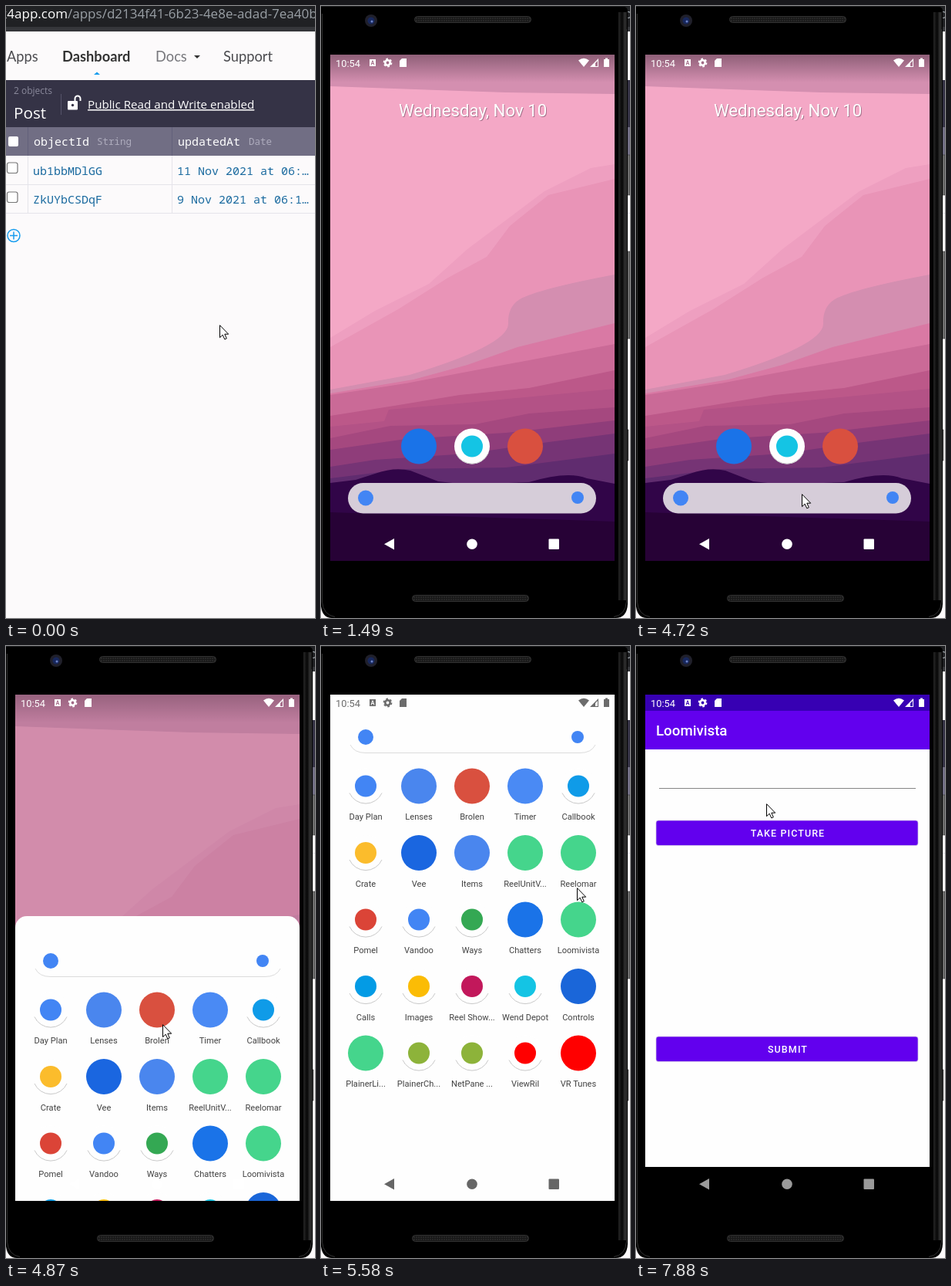
Write an HTML page that moves like this. It is 401 by 793 pixels and loops after 8 s.

```html
<!DOCTYPE html>
<html lang="en">
<head>
<meta charset="utf-8">
<title>Device demo</title>
<style>
  html, body { margin: 0; width: 100%; height: 100%; overflow: hidden; background: #fcfafb; }
  svg { display: block; width: 100%; height: 100%; }
  text { white-space: pre; }
  .ui { font-family: "Open Sans", sans-serif; }
  .menu { font: 18.3px Lato, sans-serif; fill: #4c4c50; }
  .mono { font: 15px "Noto Sans Mono", monospace; }
  .cell { fill: #1a6a9f; }
  .kind { font-size: 12.5px; fill: #aeacbd; }
  .device { font-family: Roboto, sans-serif; }
  .label { font-size: 11.1px; fill: #424242; text-anchor: middle; }
  .button { font-size: 12.5px; font-weight: 500; letter-spacing: 1.1px; fill: #fff; text-anchor: middle; }
</style>
</head>
<body>
<svg viewBox="0 0 401 793" preserveAspectRatio="none">
  <defs>
    <clipPath id="screenClip"><rect x="12" y="63" width="369" height="656"/></clipPath>
    <linearGradient id="topShade" x2="0" y2="1">
      <stop stop-color="#4a3040" stop-opacity=".5"/><stop offset="1" stop-color="#4a3040" stop-opacity="0"/>
    </linearGradient>
    <linearGradient id="edge">
      <stop stop-color="#262626"/><stop offset=".45" stop-color="#070707"/>
      <stop offset=".75" stop-color="#303030"/><stop offset="1" stop-color="#1a1a1a"/>
    </linearGradient>
    <pattern id="mesh" width="3" height="3" patternUnits="userSpaceOnUse">
      <rect width="3" height="3" fill="#181818"/><circle cx="1" cy="1" r=".8" fill="#3a3a3a"/>
    </pattern>
  </defs>

  <g id="page">
    <rect width="401" height="793" fill="#fcfafb"/>
    <rect width="401" height="33" fill="#35363a"/>
    <rect width="401" height="27" fill="#202124"/>
    <g class="ui" font-size="17">
      <text x="80" y="16" text-anchor="end" fill="#fff">k4app.com</text>
      <text x="80" y="16" fill="#9aa0a6">/apps/d2134f41-6b23-4e8e-adad-7ea40b</text>
    </g>
    <g class="menu">
      <text x="1" y="72">Apps</text>
      <text x="73" y="72" font-weight="700" fill="#333">Dashboard</text>
      <text x="194" y="72" fill="#77777c">Docs</text>
      <text x="282" y="72">Support</text>
    </g>
    <path d="M244 64h8l-4 4z" fill="#333"/>
    <path d="M114 89h8l-4-3.5z" fill="#169cee"/>
    <rect y="96" width="401" height="61" fill="#353346"/>
    <g class="ui" fill="#fff">
      <text x="10" y="114" font-size="12" fill="#8a899b">2 objects</text>
      <text x="10" y="146" font-size="20.7">Post</text>
      <text x="106" y="133" font-size="15.2" text-decoration="underline">Public Read and Write enabled</text>
    </g>
    <path d="M71.5 114v27" stroke="#55536a"/>
    <rect x="80" y="123" width="13" height="11.5" rx="1" fill="#fff"/>
    <path d="M89.5 123v-3a3.5 3.5 0 0 1 7 0v3" fill="none" stroke="#fff" stroke-width="2"/>
    <circle cx="86.5" cy="128.5" r="1.7" fill="#353346"/>
    <rect y="157" width="401" height="37" fill="#716e84"/>
    <rect x="3" y="169" width="13" height="13" rx="2" fill="#fff"/>
    <g class="mono">
      <text x="36" y="181" fill="#fff">objectId</text><text class="kind" x="118" y="180">String</text>
      <text x="223" y="181" fill="#fff">updatedAt</text><text class="kind" x="315" y="180">Date</text>
      <g class="cell">
        <text x="35" y="219">ub1bbMDlGG</text><text x="222" y="219">11 Nov 2021 at 06:…</text>
        <text x="35" y="256">ZkUYbCSDqF</text><text x="222" y="256">9 Nov 2021 at 06:1…</text>
      </g>
    </g>
    <path d="M28.5 157v37M215.5 157v37" stroke="#62607a"/>
    <path d="M0 231.5H401M0 268.5H401M28.5 194v74M215.5 194v74" stroke="#e5e4ea"/>
    <g fill="#fff" stroke="#767676" stroke-width="1.2">
      <rect x="1.5" y="203" width="13.5" height="13.5" rx="2.5"/>
      <rect x="1.5" y="241" width="13.5" height="13.5" rx="2.5"/>
    </g>
    <path d="M5 297.5h10M10 292.5v10M18 297.5a8 8 0 1 0-16 0a8 8 0 1 0 16 0" fill="none" stroke="#169cee" stroke-width="1.5"/>
  </g>

  <g id="device" class="device">
    <g fill="#6c6c6c" stroke="#333" stroke-width=".6">
      <rect x="396" y="193" width="5" height="52"/><rect x="396" y="318" width="5" height="113"/>
      <rect x="396" y="549" width="3" height="40"/>
    </g>
    <path d="M0 1H394q4 1 4 6V775q-1 18-16 18H14Q2 793 0 778Z"/>
    <rect x="386" y="8" width="11" height="762" fill="url(#edge)"/>
    <path d="M1.5 10V772Q3 789 18 791.5M396.5 30V772Q395 789 380 791.5" fill="none" stroke="#333"/>
    <g fill="url(#mesh)" stroke="#333">
      <rect x="121.5" y="13.5" width="151" height="8" rx="4"/>
      <rect x="118.5" y="763.5" width="151" height="8" rx="4"/>
    </g>
    <circle cx="65" cy="19" r="8" fill="#20202b"/><circle cx="65" cy="19" r="4.5" fill="#17275c"/>
    <circle cx="66" cy="20" r="1.5" fill="#6c83c8"/>

    <g clip-path="url(#screenClip)">
      <g id="home">
        <g id="wallpaper"></g>
        <rect x="12" y="63" width="369" height="36" fill="url(#topShade)"/>
        <g id="dock">
          <text x="198" y="144" font-size="22.2" text-anchor="middle" fill="#634057" opacity=".5">Wednesday, Nov 10</text>
          <text x="197" y="143" font-size="22.2" text-anchor="middle" fill="#fff">Wednesday, Nov 10</text>
          <rect x="35" y="618" width="322" height="39.5" rx="19.7" fill="#d6cdd9"/>
          <circle cx="58" cy="637.5" r="10" fill="#4285f4"/><circle cx="333" cy="637" r="8" fill="#4285f4"/>
        </g>
        <rect id="scrim" x="12" y="63" width="369" height="656" fill="#a36688"/>
      </g>

      <g id="drawer">
        <rect id="sheet" x="12" y="60" width="369" height="700" fill="#fefefe"/>
        <g id="apps">
          <path d="M38 128Q43 138.5 58 138.5H336Q351 138.5 356 128" fill="none" stroke="#dcdcdc"/>
          <circle cx="58" cy="118" r="10" fill="#4285f4"/><circle cx="333" cy="118" r="8" fill="#4285f4"/>
        </g>
      </g>

      <g id="app">
        <rect x="12" y="63" width="369" height="656" fill="#fefefe"/>
        <rect x="12" y="63" width="369" height="21" fill="#3700b3"/>
        <rect id="navBar" x="12" y="675" width="369" height="44"/>
        <g id="form">
          <rect x="12" y="84" width="369" height="50" fill="#6200ee"/>
          <text x="26" y="116" font-size="18.7" font-weight="500" fill="#fff">Loomivista</text>
          <path d="M30 184.5H363" stroke="#858585"/>
          <g fill="#6200ee" stroke="#d9d2e4" stroke-width=".7">
            <rect x="26" y="226" width="340" height="32.5" rx="3"/><rect x="26" y="506" width="340" height="32.5" rx="3"/>
          </g>
          <text class="button" x="197" y="247">TAKE PICTURE</text>
          <text class="button" x="197" y="527">SUBMIT</text>
        </g>
      </g>

      <g id="status">
        <text x="19" y="78.5" font-size="12.8">10:54</text>
        <path fill-rule="evenodd" d="M63 69h8v9h-8zM64.5 76.5h1l.5-1.5h2l.5 1.5h1l-2-6h-1zM66.3 74h1.4l-.7-2z"/>
        <circle cx="86.5" cy="73.5" r="3.2" fill="none" stroke="currentColor" stroke-width="2.6"/>
        <circle cx="86.5" cy="73.5" r="5" fill="none" stroke="currentColor" stroke-width="1.8" stroke-dasharray="2.6"/>
        <path d="M105 68h6v11h-9v-8z"/>
        <path d="M334 70.5Q341 65 348 70.5L341 79Z"/>
        <path fill-rule="evenodd" d="M349 79L360 68V79ZM356 78h3V71l-3 3z"/>
        <path d="M367 69h2v-1.5h3V69h2v10h-7z"/>
      </g>
      <g id="nav"><path d="M95 690v14.5L82 697.2Z"/><circle cx="196" cy="697.3" r="6.8"/><rect x="295.5" y="690.5" width="13.5" height="13.5" rx="1"/></g>
    </g>
  </g>

  <path id="cursor" d="M.5 .7V16.7L4.2 13.2L6.8 18.9L9.3 17.8L6.8 12.2H11.7Z" fill="#fff" stroke="#000" stroke-linejoin="round"/>
</svg>

<script>
const $ = id => document.getElementById(id);
const DURATION = 8000;

function add(parent, tag, attrs, text = '') {
  const node = document.createElementNS('http://www.w3.org/2000/svg', tag);
  for (const name in attrs) node.setAttribute(name, attrs[name]);
  node.textContent = text;
  parent.append(node);
}

// Wallpaper layers, back to front; each outline is closed along the screen bottom.
const layers = [
  ['#f4a8c6', 'M12 63H381'],
  ['#ee9fc0', 'M12 430L70 395L140 360L190 315L250 270L290 240L350 210L381 205'],
  ['#e994b7', 'M12 442L100 393L165 352L215 325L245 285L295 245L381 224'],
  ['#d48eb0', 'M12 497L115 478Q242 440 243 412Q242 390 258 380Q280 367 381 348'],
  ['#d979a4', 'M12 502L120 484L190 465L255 442L381 411'],
  ['#ca6a97', 'M12 504L110 489L200 472L270 459L381 438'],
  ['#bc5889', 'M12 531L95 518L180 504L270 495L381 472'],
  ['#b35286', 'M12 545L82 538L88 523L190 514L381 496'],
  ['#a5487f', 'M12 560L90 544L200 542L270 528L381 520'],
  ['#8f3d7a', 'M12 575L110 561L240 553L381 537'],
  ['#763475', 'M12 597L70 588L190 580L280 567L381 554'],
  ['#602c6f', 'M12 612L110 600L240 598L381 580'],
  ['#310548', 'M12 618L45 614L70 606Q95 597 116 602L152 616L190 620L270 617Q320 602 345 612L381 619'],
  ['#270236', 'M12 656L381 668']
];
layers.forEach(([fill, line]) => add($('wallpaper'), 'path', { d: line + 'V719H12Z', fill }));
add($('wallpaper'), 'path', { d: 'M12 63H381V114L240 112L150 109L12 104Z', fill: '#d48fb0' });

function icon(parent, cx, cy, fill, onPlate) {
  if (onPlate) {
    add(parent, 'circle', { cx, cy, r: 23, fill: '#fefefe' });
    add(parent, 'path', { d: `M${cx - 21} ${cy + 9}A23 23 0 0 0 ${cx + 21} ${cy + 9}`, fill: 'none', stroke: '#c9c9c9' });
  }
  add(parent, 'circle', { cx, cy, r: onPlate ? 14 : 23, fill });
}

icon($('dock'), 127, 570.5, '#1a73e8');
icon($('dock'), 196, 570.5, '#14c4e4', true);
icon($('dock'), 265, 570.5, '#d9503f');

// Name, colour, and a trailing "o" when the colour sits on a white plate.
const apps = `Day Plan #4285f4 o|Lenses #4a86ee|Brolen #d9503f|Timer #4a8af4|Callbook #0f9be8 o
Crate #fbbc2c o|Vee #1a66e0|Items #4a86ee|ReelUnitV... #45d58c|Reelomar #45d58c
Pomel #db4437 o|Vandoo #4285f4 o|Ways #34a853 o|Chatters #1a73e8|Loomivista #45d58c
Calls #039be5 o|Images #fbbc05 o|Reel Show... #c2185b o|Wend Depot #14c4e4 o|Controls #1a66d9
PlainerLi... #45d58c|PlainerCh... #8db33a o|NetPane ... #8db33a o|ViewRil #ff0000 o|VR Tunes #ff0000`;
apps.split('\n').forEach((row, r) => row.split('|').forEach((entry, c) => {
  const [, name, color, plate] = entry.match(/^(.*) (#\w+)( o)?$/);
  const x = 58 + 69 * c, y = 181.5 + 86.5 * r;
  icon($('apps'), x, y, color, plate);
  add($('apps'), 'text', { x, y: y + 43.5, class: 'label' }, name);
}));

// Screen updates: time, pointer x, pointer y. The pointer waits off stage at -99.
const updates = [
  [0, 277, 413], [120, 274, 402], [240, 268, 386], [360, 265, 377], [510, 334, 443], [630, -99, 0],
  [1490, -99, 0], [3370, 269, 598], [3520, 314, 718], [3670, 321, 600], [3790, 287, 472],
  [3940, 280, 449], [4060, 262, 478], [4180, 244, 525], [4300, 230, 570], [4450, 222, 602],
  [4600, 217, 633], [4720, 215, 632], [4870, 203, 490], [5020, 182, 259], [5140, 215, 262],
  [5290, 264, 273], [5440, 321, 287], [5580, 332, 313], [5710, 337, 345], [5830, 320, 367],
  [6000, 320, 367], [6120, 320, 367], [6250, 320, 367], [6370, 320, 367], [6530, 320, 367],
  [6650, 308, 368], [6770, 291, 368], [6920, 284, 368], [7050, 277, 368], [7200, 276, 368],
  [7340, 271, 364], [7490, 248, 338], [7610, 217, 297], [7730, 188, 257], [7880, 169, 204]
];

const show = (id, visible) => $(id).style.display = visible ? '' : 'none';
const clamp = v => Math.max(0, Math.min(1, v));
function tint(id, color, opacity) {
  Object.assign($(id).style, { fill: color, color, opacity });
}

function render(time) {
  const [tick, x, y] = updates.findLast(update => update[0] <= time);
  const drawerOpen = tick >= 4870, settled = tick >= 5290, launched = tick >= 6530;

  show('device', tick >= 1490);
  show('dock', !drawerOpen);
  show('drawer', drawerOpen && !launched);
  show('app', launched);
  show('form', tick >= 7200);
  $('cursor').setAttribute('transform', `translate(${x} ${y})`);

  const offset = drawerOpen ? Math.floor(290 * Math.exp((4870 - tick) / 72)) : 0;
  $('drawer').setAttribute('transform', `translate(0 ${offset})`);
  $('sheet').setAttribute('rx', Math.min(offset, 15));
  $('scrim').style.opacity = drawerOpen ? clamp(1.15 - offset / 400) : 0;

  const fade = launched ? 1 : clamp(1 - (tick - 5880) / 490);
  $('apps').style.opacity = fade;
  $('navBar').setAttribute('height', tick >= 6650 ? 44 : 42);

  const dim = Math.round(255 - 101 * clamp((tick - 7080) / 800));
  const navColor = launched ? `rgb(${dim},${dim},${dim})`
    : settled ? '#666' : drawerOpen && offset < 100 ? '#f5f5f5' : '#fff';
  tint('status', settled && !launched ? '#6c6c6c' : '#fff', fade);
  tint('nav', navColor, fade);
}

const start = performance.now();
function loop() {
  render((performance.now() - start) % DURATION);
  requestAnimationFrame(loop);
}
loop();
</script>
</body>
</html>
```
